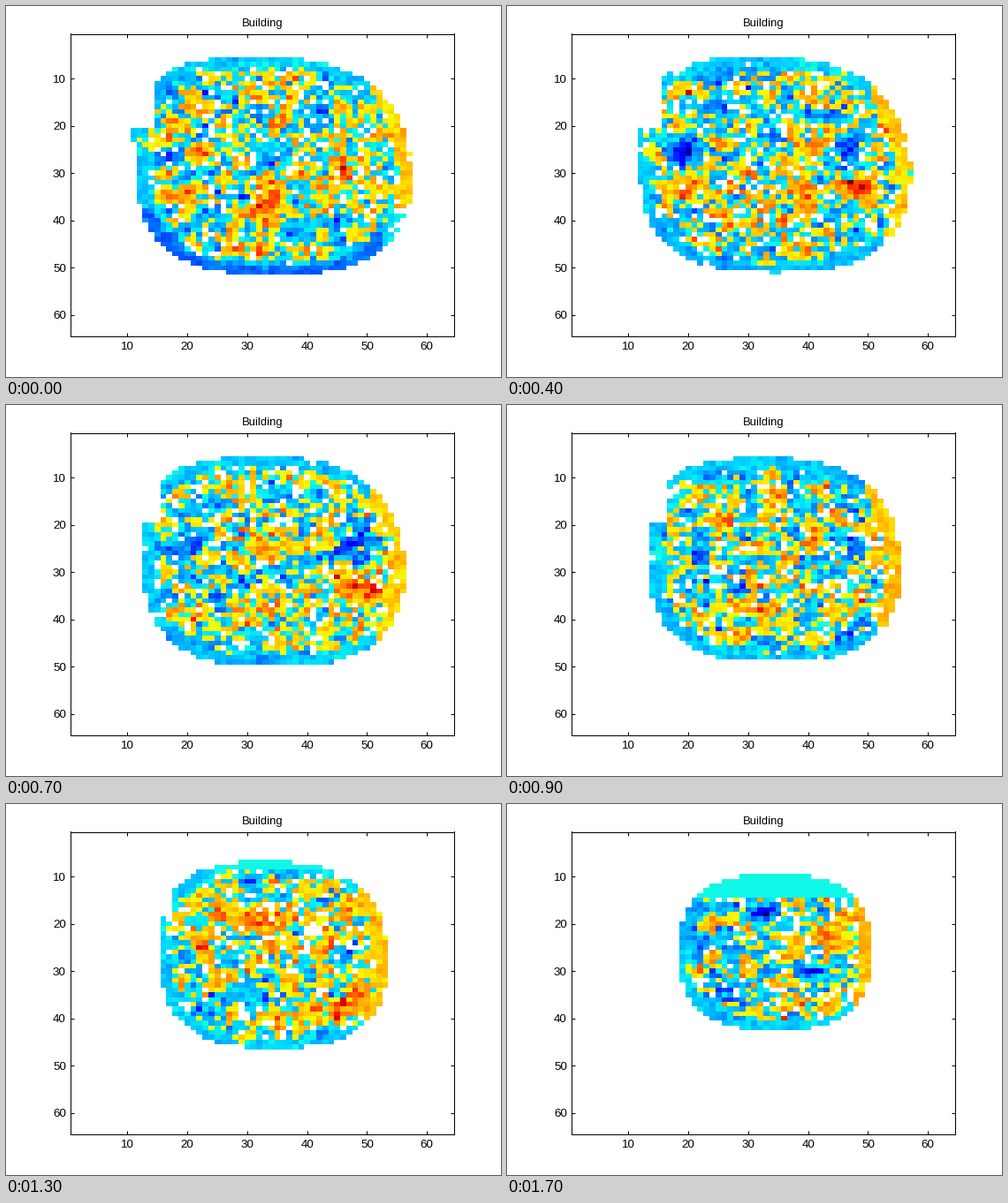
These frames come from a looping animation (560 px wide and 420 px high, 1.8 s). A matplotlib script:

```python
import numpy as np
import matplotlib.pyplot as plt
from matplotlib.animation import FuncAnimation

FRAMES, STEP, N = 18, 100, 64
PX = 0.72          # one pixel in points at 100 dpi
GAP = 0.03         # values closer to zero than this stay white
ROUNDNESS = 2.7    # exponent of the superellipse outline
BLOB_LIFE = 3      # frames a blob takes to fade in or out

# Key activity spots: column, row, width, height, strength, time of peak
BLOBS = [
    (19.5, 25.5, 3, 3, -0.75, 4),
    (47.5, 24, 2.5, 3, -0.65, 6.5),
    (18.5, 34.5, 2.6, 2.3, 0.65, 2),
    (49, 33.5, 2.6, 2.6, 0.65, 4.5),
    (34, 37, 3.2, 4, 0.55, 0),
    (33, 38.5, 3, 2.5, 0.45, 9),
    (31, 19, 10, 3, 0.35, 13),
    (46, 37, 4, 3, 0.45, 13),
    (29, 17, 9, 1.8, -0.4, 17),
    (41, 30, 4.5, 1, -0.45, 17),
]

plt.rcParams["font.family"] = "Liberation Sans"
plt.rcParams["font.size"] = 9.6

col, row = np.meshgrid(np.arange(1, N + 1), np.arange(1, N + 1))


def outline(t):
    """Normalised offsets from the centre, the mask and its top row."""
    shrink = (t / (FRAMES - 1)) ** 2
    left, right = 12 + 7 * shrink, 57 - 7 * shrink
    top, bottom = 6 + 4 * shrink ** 2, 51 - 9 * shrink
    middle = (top + bottom) / 2
    dy = (row - middle) / ((bottom - top) / 2 + 0.5)
    lean = 3 * np.minimum(dy, 0) * (1 - shrink)
    dx = (col - (left + right) / 2 - lean) / ((right - left) / 2 + 0.5)
    radius = (abs(dx) ** ROUNDNESS + abs(dy) ** ROUNDNESS) ** (1 / ROUNDNESS)
    notch = (col < left + 3 * (1 - shrink)) & (row < middle - 8)
    return dx, dy, radius, (radius <= 1) & ~notch, top


def grain(t):
    """Fine noise mixed with a softer, patchy layer."""
    fine, soft = np.random.default_rng(40 + t).normal(0, 1, (2, N, N))
    for axis in (0, 1):
        soft = (soft + np.roll(soft, 1, axis) + np.roll(soft, -1, axis)) / 3 ** 0.5
    return 0.16 * fine + 0.15 * soft


def activity(t):
    total = np.zeros((N, N))
    for x, y, width, height, strength, peak in BLOBS:
        spot = np.exp(-((col - x) / width) ** 2 - ((row - y) / height) ** 2)
        total += strength * spot * np.exp(-((t - peak) / BLOB_LIFE) ** 2)
    return total


def colors(values, inside):
    size = np.clip((abs(values) - GAP) / (1 - GAP), 0, 1)
    place = np.where(values < 0, 0.375 * (1 - size), 0.635 + 0.365 * size)
    rgb = plt.cm.jet(place)[..., :3]
    rgb[~inside | (abs(values) < GAP)] = 1
    return rgb


def picture(t):
    dx, dy, radius, inside, top = outline(t)
    rim = np.clip((radius - 0.84) / 0.1, 0, 1)
    edge = np.where(dx > 0.8, 0.18, -0.15)          # warm on the right only
    edge -= 0.25 * np.exp(-t / 3) * (dy > 0.4)      # cold underside at first
    values = activity(t) + grain(t) * (1 - 0.7 * rim) + edge * rim
    values[row < top + t - 12] = -0.05              # flat cap near the end
    return colors(values, inside)


fig = plt.figure(figsize=(5.6, 4.2), dpi=100, facecolor="white")
ax = fig.add_axes([0.13, 0.11, 0.775, 0.815])
image = ax.imshow(picture(0), aspect="auto", interpolation="nearest",
                  extent=(0.5, N + 0.5, N + 0.5, 0.5))
ax.set_axisbelow(False)
ax.set_xticks(range(10, 61, 10))
ax.set_yticks(range(10, 61, 10))
ax.tick_params(direction="in", top=True, right=True, length=4.34 * PX, width=PX)
ax.tick_params(axis="x", pad=6.5 * PX)
ax.tick_params(axis="y", pad=5 * PX)
for spine in ax.spines.values():
    spine.set_linewidth(PX)
ax.set_title("Building", fontsize=9.4, pad=9 * PX)


def update(t):
    image.set_data(picture(t))
    return [image]


anim = FuncAnimation(fig, update, frames=FRAMES, interval=STEP, repeat=True)
plt.show()
```
